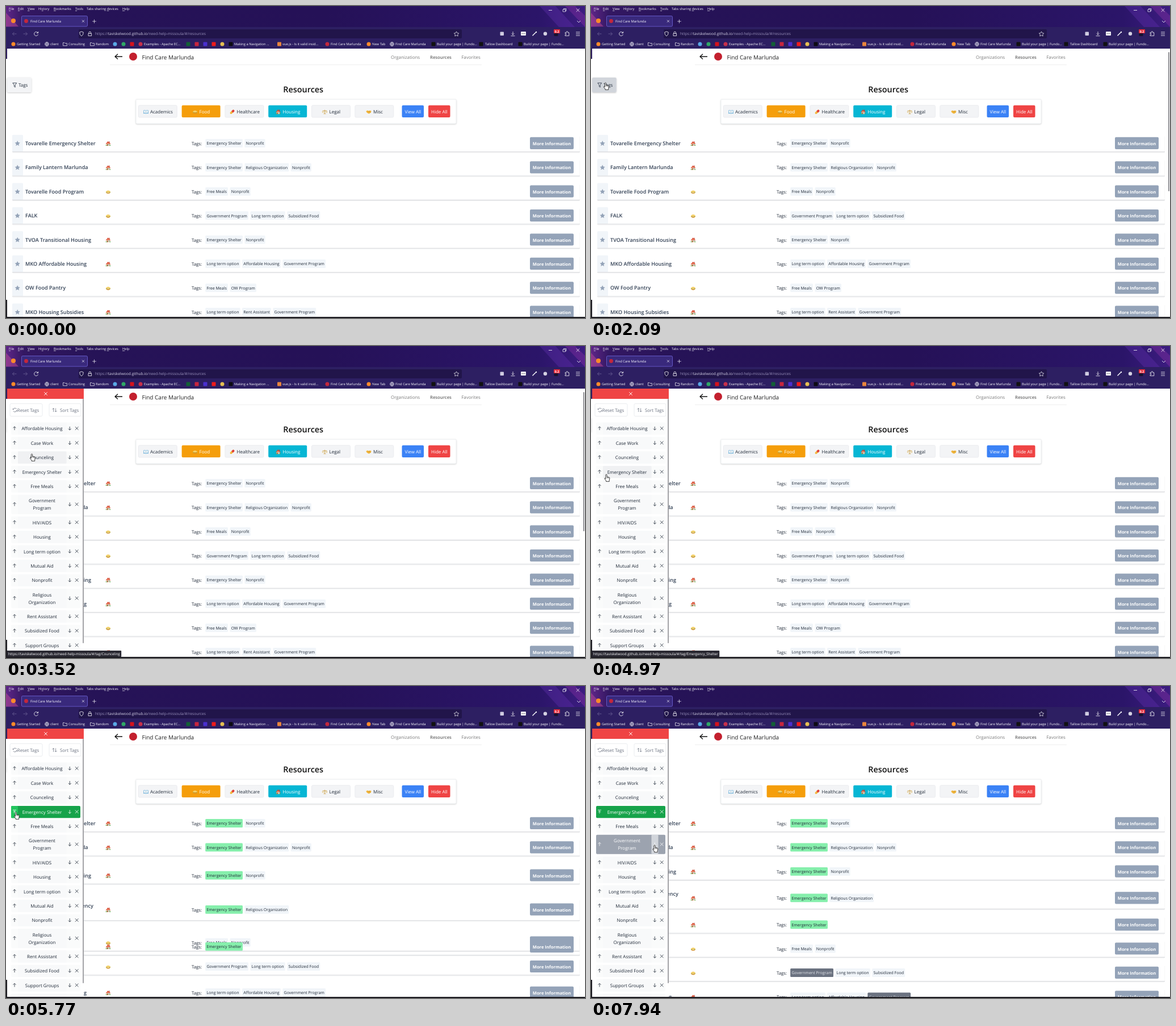
Write an HTML page that moves like this. It is 1020x549 px and loops after 8 s.

```html
<!DOCTYPE html>
<html lang="en">
<head>
<meta charset="utf-8">
<title>Find Care Marlunda</title>
<style>
  html, body { margin: 0; width: 100%; height: 100%; overflow: hidden; background: #fff; }
  svg { display: block; width: 100vw; height: 100vh; }
  text { font-family: 'Open Sans', 'Noto Sans', sans-serif; text-rendering: geometricPrecision; white-space: pre; }
</style>
</head>
<body>
<svg viewBox="0 0 1020 549">
  <defs>
    <linearGradient id="theme">
      <stop offset="0" stop-color="#5f2688"/><stop offset=".03" stop-color="#341863"/>
      <stop offset=".15" stop-color="#261357"/><stop offset=".55" stop-color="#251157"/>
      <stop offset=".92" stop-color="#2b1569"/><stop offset="1" stop-color="#3c1c80"/>
    </linearGradient>
    <filter id="soft" x="-20%" y="-20%" width="140%" height="150%">
      <feDropShadow dx="0" dy=".7" stdDeviation=".9" flood-opacity=".25"/>
    </filter>
  </defs>
  <g id="page"></g>
  <g id="live"></g>
  <g id="chrome"></g>
</svg>
<script>
const LOOP = 8000;
const SITE = 'Find Care Marlunda';
const HOST = 'https://taviskelwood.github.io', PATH = '/need-help-missoula/#/';
const byId = id => document.getElementById(id);

// Drawing helpers: each returns SVG markup
const rect = (x, y, w, h, fill, r = 0, more = '') =>
  `<rect x="${x}" y="${y}" width="${w}" height="${h}" rx="${r}" fill="${fill}" ${more}/>`;
const disc = (x, y, r, fill) => `<circle cx="${x}" cy="${y}" r="${r}" fill="${fill}"/>`;
const line = (d, stroke, w = .8, fill = 'none') =>
  `<path d="${d}" stroke="${stroke}" stroke-width="${w}" fill="${fill}" stroke-linejoin="round"/>`;
const shape = (d, fill, more = '') => `<path d="${d}" fill="${fill}" ${more}/>`;
const text = (x, y, size, str, fill, more = '') =>
  `<text x="${x}" y="${y}" font-size="${size}" fill="${fill}" ${more}>${str}</text>`;
const at = (x, y, body) => `<g transform="translate(${x} ${y})">${body}</g>`;
const MID = 'text-anchor="middle"';

const pen = document.createElement('canvas').getContext('2d');
function textWidth(str, size) {
  pen.font = `${size}px 'Open Sans', 'Noto Sans', sans-serif`;
  return pen.measureText(str).width;
}

// Timing helpers
const ramp = (t, a, b) => Math.min(1, Math.max(0, (t - a) / (b - a)));
const smooth = k => k * k * (3 - 2 * k);
function ease(x) { // CSS "ease" curve
  let lo = 0, hi = 1, s = .5;
  for (let i = 0; i < 20; i++) {
    s = (lo + hi) / 2;
    const bx = .75 * (1 - s) * s + s ** 3;
    if (bx < x) lo = s; else hi = s;
  }
  return .3 * (1 - s) ** 2 * s + 3 * (1 - s) * s * s + s ** 3;
}

// Small pictograms, centred on 0,0
const icon = {
  house: rect(-2.9, -.6, 5.8, 4.4, '#f0d9b4') + rect(1.5, -3.9, 1.2, 2.4, '#b5402c') +
    shape('M-4.2 .4L-.4-4.2 4.2 .4 3.2 1 -.4-2.2-3.4 1Z', '#d9472f') + shape('M-2.9 0L-.4-2.4 2.6 0Z', '#e2674a') +
    rect(-2, .9, 1.7, 2.9, '#9a5b3a') + rect(.7, .8, 1.5, 1.5, '#6fa9cc') + disc(-3.4, 3, .9, '#57a345') + disc(3.3, 3, .9, '#57a345'),
  sandwich: shape('M-4.2 0Q-3-2.6 0-2.6T4.2 0L3.6 1H-3.6Z', '#f3cf69') + shape('M-4 .3Q0 1.9 4 .3L3.6 1.3H-3.6Z', '#7a9a36') +
    shape('M-4 .9Q0 2.4 4 .9Q3.2 3.3 0 3.3T-4 .9Z', '#d6942f'),
  book: shape('M-4.5-2.5Q-2-3.6 0-2.4Q2-3.6 4.5-2.5V3Q2 2.2 0 3.2Q-2 2.2-4.5 3Z', '#5aa7d6') +
    shape('M-3.9-2.4Q-2-3 0-1.8Q2-3 3.9-2.4V2Q2 1.4 0 2.4Q-2 1.4-3.9 2Z', '#e8f1f6') + line('M0-1.8V2.6', '#9db9c8', .5),
  pill: '<g transform="rotate(-42)">' + rect(-4.6, -1.9, 9.2, 3.8, '#f3b53f', 1.9) +
    shape('M0-1.9H2.7A1.9 1.9 0 0 1 2.7 1.9H0Z', '#df3e3e') + '</g>',
  scales: line('M0-3.6V3M-3.6-2H3.6M-2 3.4H2', '#c79a3a', .8) +
    shape('M-4.8 .2H-1.4Q-3 2.6-4.8 .2M1.4 .2H4.8Q3 2.6 1.4 .2', '#e3bd62') + line('M-3.2-2L-4.6 .2M-3.2-2L-1.6 .2M3.2-2L1.6 .2M3.2-2L4.6 .2', '#c79a3a', .4),
  hands: shape('M-4.6-1.4L-2-2.6 0-1.6 2.2-2.6 4.6-1.2 3.6 1.4 .8 3.2-1.2 2.6-3.8 .8Z', '#f0b53c') + line('M-1 0L1-1 3 1', '#b97f1e', .6),
  globe: line('M-3.4 0A3.4 3.4 0 1 1 3.4 0A3.4 3.4 0 1 1-3.4 0M-3.4 0H3.4M0-3.4Q-3 0 0 3.4Q3 0 0-3.4', '#fbfbfe', .7),
  folder: line('M-3.5-2.4H-1L0-1.4H3.5V2.8H-3.5Z', '#fbfbfe', .7)
};

const upArrow = 'M0 3.1V-3M-2.5-.6L0-3.1 2.5-.6';
const topArrow = 'M-3-3H3M0 3.1V-1.4M-2.2 .7L0-1.5 2.2 .7';
const downArrow = 'M0-3.1V3M-2.5 .6L0 3.1 2.5 .6';
const cross = 'M-2.8-2.8L2.8 2.8M2.8-2.8L-2.8 2.8';

function chromeMarkup() {
  const W = '#fbfbfe', dim = '#6d6399';
  let s = rect(0, 0, 1020, 37, 'url(#theme)') +
    shape('M940 0H968L1002 37H974Z', '#6a35b8', 'opacity=".3"') +
    shape('M985 0H1003L1020 17V37Z', '#a13bb0', 'opacity=".3"') +
    shape('M0 12L22 36H0Z', '#d8569a', 'opacity=".4"') +
    rect(0, 37, 1020, 38, '#2d1f62') + rect(128, 41, 675, 16, '#21154a', 2);

  const menus = [[5, '_File'], [21, '_Edit'], [38, '_View'], [57, 'Hi_story'], [84, '_Bookmarks'],
    [122, '_Tools'], [142, 'Tabs sharing _devices'], [205, '_Help']];
  for (const [x, name] of menus)
    s += text(x, 7.4, 5.85, name.replace(/_(.)/, '<tspan text-decoration="underline">$1</tspan>'), W);

  // Tab strip and window buttons
  s += disc(13, 26, 4, '#ff8a2a') + rect(27.5, 17.5, 116, 18.5, '#39297c', 2, 'stroke="#6a5fd0" stroke-width=".9"') +
    disc(35.5, 26.5, 3.4, '#c3273c') + text(43, 29, 5.9, SITE, W) +
    at(136, 26.7, line('M-2-2L2 2M2-2L-2 2', W, .7)) + at(155.5, 27, line('M-3.3 0H3.3M0-3.3V3.3', W, .7)) +
    line('M956 7.5H962', W, .8) + line('M981 6H985.5V10H981ZM982.5 6V4.7H987V8.7H985.5', W, .7) +
    at(1007.5, 7.3, line(cross, W, .8)) + line('M1006 26L1009 29 1012 26', W, .8);

  // Navigation bar
  s += line('M18.5 49H11.5M14.5 46L11.5 49 14.5 52M30.5 49H37.5M34.5 46L37.5 49 34.5 52', dim) +
    line('M56 47A3.5 3.5 0 1 0 56.5 50M56.7 45V47.6H54', W) +
    line('M133 45L136.3 46.2Q136.3 51.5 133 53Q129.7 51.5 129.7 46.2Z', W) +
    line('M145 48.5H150.6V52.5H145ZM146 48.5V47A1.8 1.8 0 0 1 149.6 47V48.5', W) +
    text(157, 51.4, 6.65, `${HOST.slice(0, 8)}<tspan fill="#d8d4ea">${HOST.slice(8)}</tspan>${PATH}resources`, '#9a92bd') +
    line('M793.5 44.9L794.9 47.6 797.8 48 795.7 50.1 796.2 53 793.5 51.6 790.8 53 791.3 50.1 789.2 48 792.1 47.6Z', W, .7) +
    rect(870.5, 45.5, 6.5, 6.5, '#cfcbe0', 1) + line('M893 45V50.5M890.7 48.3L893 50.6 895.3 48.3M889.5 52.6H896.5', W) +
    rect(907, 45, 9, 7, '#f1f0f6', 1) + [909.3, 911.5, 913.7].map(x => disc(x, 48.6, .7, '#333')).join('') +
    line('M927.5 52.3L933 46.8', W, 1.4) + disc(934, 46, 1.2, W) + disc(950, 48.8, 3.2, '#d5d2e2') +
    rect(965.5, 47, 7, 6, '#17112f', 1) + rect(965, 41, 11, 7, '#e22b3c', 1) +
    text(970.5, 46.6, 5.4, '0.2', '#fff', MID + ' font-weight="700"') +
    line('M985 46.8H987.2Q987 44.6 988.5 44.6T989.8 46.8H991.8V52.4H985V50.6Q987 50.6 987 49.5T985 48.4Z', W) +
    line('M1004 46H1011M1004 49H1011M1004 52H1011', W);

  // Bookmarks: icon x, icon (pictogram, or o/s for disc/square and its colour), text x, label
  const marks = [[13, 'o#ff8a2a', 19, 'Getting Started'], [72, 'globe', 78, 'client'], [104, 'folder', 110, 'Consulting'],
    [152, 'folder', 158, 'Random'], [192, 'o#5aa9e6'], [207, 'o#2fa866'], [222, 's#d5121c'],
    [237, 'o#c8304a', 243, 'Examples - Apache EC...'], [321, 's#125f36'], [336, 's#c9263e'], [351, 's#4a2fd0'], [366, 's#f01b1b'],
    [381, 'o#e6bf52'], [396, 's#0d0b12', 402, 'Making a Navigation ...'], [481.5, 's#e8843c', 487, 'vue.js - Is it valid insid...'],
    [566, 'o#c3273c', 572, SITE], [639, 'o#ff8a2a', 645, 'New Tab'], [680, 'globe', 686, SITE],
    [753, 's#111', 759, 'Build your page | Fundo...'], [837, 's#111', 844, 'Tallow Dashboard'], [906, 's#111', 912, 'Build your page | Fundo...']];
  for (const [x, kind, tx, label] of marks) {
    const fill = kind.slice(1);
    s += icon[kind] ? at(x, 67, icon[kind]) : kind[0] === 'o' ? disc(x, 67, 3.5, fill) : rect(x - 3.5, 63.5, 7, 7, fill, 1);
    if (label) s += text(tx, 69.1, 5.85, label, W);
  }
  // Window edges
  return s + rect(0, 74, 2, 19, '#2b1a5c') + rect(0, 517, 2, 32, '#1b1a20') + rect(0, 547, 1020, 2, '#1b1a20');
}

function pageMarkup() {
  let s = rect(0, 75, 1020, 474, '#fff') +
    line('M205 89H192M197 84.5L192 89 197 93.5', '#111', 1.3) + disc(224, 89, 7, '#c3202e') +
    text(239.5, 93.8, 10, SITE, '#222') + rect(183, 103, 655, 1, '#efefef') +
    text(678, 92.8, 7.9, 'Organizations', '#7b7b7b') + text(747, 92.8, 7.7, 'Resources', '#6a6a6a', 'font-weight="600"') +
    text(802.3, 92.8, 7.9, 'Favorites', '#7b7b7b') +
    text(523.7, 151.8, 14.4, 'Resources', '#111', MID + ' font-weight="600"') +
    rect(229, 164.3, 564, 42.7, '#fff', 2, 'stroke="#e5e7eb" stroke-width=".6" filter="url(#soft)"');
  const filters = [['Academics', 'book', 246.5, 254], ['Food', 'sandwich', 333, 340.5, '#f59e0b'], ['Healthcare', 'pill', 398.5, 406.5],
    ['Housing', 'house', 479.5, 487.5, '#06b6d4'], ['Legal', 'scales', 561.5, 569.5], ['Misc', 'hands', 639, 647]];
  filters.forEach(([name, pic, ix, tx, fill], i) => {
    s += rect(233.3 + i * 76.3, 174.7, 68, 21.3, fill || '#f3f4f6', 2, fill ? '' : 'stroke="#e5e7eb" stroke-width=".7"') +
      at(ix, 186.3, icon[pic]) + text(tx, 189.3, 8, name, fill ? '#fff' : '#1f2937');
  });
  return s + rect(697.5, 174.7, 38.5, 21.3, '#3b82f6', 2) + text(716.8, 189.3, 8, 'View All', '#fff', MID) +
    rect(744, 174.7, 38.5, 21.3, '#ef4444', 2) + text(763.3, 189.3, 8, 'Hide All', '#fff', MID);
}

// Resource rows: name lines, pictogram, tags, centre before and after sorting
const ES = 'Emergency Shelter', NP = 'Nonprofit', GP = 'Government Program', LT = 'Long term option';
const resources = [
  ['Tovarelle Emergency Shelter', 'house', [ES, NP], 241.4, 241.4],
  ['Family Lantern Marlunda', 'house', [ES, 'Religious Organization', NP], 283.8, 283.8],
  ['Tovarelle Food Program', 'sandwich', ['Free Meals', NP], 326.2, 462],
  ['FALK', 'sandwich', [GP, LT, 'Subsidized Food'], 368.6, 504.4],
  ['TVOA Transitional Housing', 'house', [ES, NP], 411, 326.2],
  ['MKO Affordable Housing', 'house', [LT, 'Affordable Housing', GP], 453.4, 546.8],
  ['OW Food Pantry', 'sandwich', ['Free Meals', 'OW Program'], 495.8, 589.2],
  ['MKO Housing Subsidies', 'house', [LT, 'Rent Assistant', GP], 538.2, 631.6],
  ['Ashgrove Home Emergency|Shelter', 'house', [ES, 'Religious Organization'], 626.8, 372.8],
  ['Harbor Nook', 'house', [ES], 900, 419.8]
];
const STAR = 'M0-4.6L1.4-1.6 4.6-1.2 2.2 1 2.9 4.2 0 2.6-2.9 4.2-2.2 1-4.6-1.2-1.4-1.6Z';

function resourceRow([name, pic, tags, from, to], t) {
  const y = from + (to - from) * ease(ramp(t, 5390, 5970));
  const lines = name.split('|'), half = lines.length > 1 ? 19 : 14.7;
  let s = rect(11, -half, 19, half * 2, '#f1f5f9', 1.5) +
    rect(11, half, 1000, 1.1, '#d6d8db') + rect(12, half + 1.1, 998, 1.2, '#f0f1f2') + rect(1010.5, -half + 3, .6, half * 2 - 3, '#f1f1f1') +
    at(20.2, .3, shape(STAR, '#94a3b8'));
  lines.forEach((str, i) =>
    s += text(34, 3.6 + (i - (lines.length - 1) / 2) * 14, 9.1, str, '#334155', 'font-weight="600"'));
  s += at(180, .8, icon[pic]) + text(327, 3.6, 7.8, 'Tags:', '#1f2937');
  let x = 351.2;
  for (const tag of tags) {
    const w = textWidth(tag, 7.05) + 4.4;
    const green = tag === ES ? ramp(t, 5330, 5420) : 0, gray = tag === GP ? ramp(t, 7850, 7940) : 0;
    s += rect(x, -7.3, w, 14.8, '#f1f5f9', 1.5) +
      rect(x, -7.3, w, 14.8, green ? '#86efac' : '#6b7280', 1.5, `opacity="${green + gray}"`) +
      text(x + 2.2, 3, 7.05, tag, gray > .5 ? '#e5e7eb' : '#1f2937');
    x += w + 3.4;
  }
  s += rect(923, -10.6, 77, 21.2, '#94a3b8', 2) + text(961.5, 3.6, 7.6, 'More Information', '#fff', MID + ' font-weight="700"');
  return at(0, y, s);
}

// Sidebar rows, stacked top to bottom
const tagRows = ['Affordable Housing', 'Case Work', 'Counceling', ES, 'Free Meals', 'Government|Program', 'HIV/AIDS', 'Housing',
  LT, 'Mutual Aid', NP, 'Religious|Organization', 'Rent Assistant', 'Subsidized Food', 'Support Groups', ''];
const cells = [[9, 21], [21, 106.5], [106.5, 118.5], [118.5, 131]];

function sidebar(t, mouse) {
  let s = rect(2, 75, 135, 473, '#fff') + rect(2, 75, 135, 18, '#ef4444') + at(70, 84, line(cross, '#fff', .9)) +
    rect(7, 101.5, 57, 22, '#fff', 2, 'stroke="#e5e7eb" stroke-width=".8"') +
    rect(76, 101.5, 56, 22, '#fff', 2, 'stroke="#e5e7eb" stroke-width=".8"') +
    line('M12.6 111.6A3.3 3.3 0 0 1 18.6 111M18.8 113.6A3.3 3.3 0 0 1 12.8 114.4M11.4 110.4L12.6 112 14 110.8M20 114.8L18.8 113.2 17.4 114.4', '#6b7280') +
    text(19.8, 116, 7.9, 'Reset Tags', '#6b7280') +
    line('M83.5 116V109.5M81.5 111.5L83.5 109.5 85.5 111.5M87.6 109.5V116M85.6 114L87.6 116 89.6 114', '#6b7280', .7) +
    text(95, 116, 7.9, 'Sort Tags', '#6b7280');
  let top = 134.6;
  tagRows.forEach((name, i) => {
    const lines = name.split('|'), h = lines.length > 1 ? 34 : 21.4, y = top + h / 2;
    const on = i === 3 ? ramp(t, 5330, 5420) : i === 5 ? ramp(t, 7850, 7940) : 0;
    const ink = on > .5 ? '#fff' : '#1f2937';
    s += rect(9, top, 122, h, '#fafbfb', 2) + rect(21, top, 85.5, h, '#f8f9fa') +
      rect(9, top, 122, h, i === 3 ? '#16a34a' : '#9ca3af', 2, `opacity="${on}"`);
    if (t > 2790 && mouse.y >= top && mouse.y < top + h)
      cells.forEach(([a, b], c) => {
        if (mouse.x < a || mouse.x >= b) return;
        const fill = on > .5 ? (i === 3 ? '#22c55e' : '#d1d5db') : c === 1 ? '#f0f1f3' : '#e5e7eb';
        s += rect(a, top, b - a, h, fill, 1.5);
      });
    lines.forEach((str, n) => s += text(63.5, y + 3 + (n - (lines.length - 1) / 2) * 12.8, 8, str, ink, MID));
    s += at(15, y - .4, line(i === 3 && on > .5 ? topArrow : upArrow, ink)) +
      at(112.3, y - .4, line(downArrow, ink)) + at(124.7, y - .4, line(cross, ink));
    top += h + 4.05;
  });
  return s + rect(135.3, 93, 1.5, 430, '#85858a', .7);
}

// Pointer path: time, x, y
const path = [[1230, 215, 325], [2010, 25.5, 135], [2700, 25.5, 135], [3070, 44, 152], [3520, 45.5, 190], [3700, 42, 200],
  [3890, 42, 200], [3980, 42, 202], [4160, 42, 202], [4880, 27, 226], [4970, 27, 226], [5150, 17.5, 222],
  [6780, 17.5, 222], [7580, 112, 280], [LOOP, 112, 280]];
function pointer(t) {
  const i = Math.max(1, path.findIndex(p => p[0] > t));
  const [t0, x0, y0] = path[i - 1], [t1, x1, y1] = path[i], k = smooth(ramp(t, t0, t1));
  return { x: x0 + (x1 - x0) * k, y: y0 + (y1 - y0) * k };
}
const HAND = 'M-1.1 .6Q0-1.1 1.1 .6V4.2L4.9 5Q6 5.3 5.9 6.8L5.2 10.2V12.4H-.4V11L-3 7.8Q-3.3 6.3-2 6.5L-1.1 7.6Z';
const ARROW = 'M0 0V10L2.4 7.8 4 11.3 5.5 10.7 3.9 7.2H7Z';

const links = [[2790, 3200, 'Affordable_Housing'], [3200, 3430, 'Case_Work'], [3430, 4470, 'Counceling'], [4470, 5330, 'Emergency_Shelter']];

function scene(t) {
  const mouse = pointer(t), overTags = ramp(t, 2000, 2090);
  let s = resources.map(r => resourceRow(r, t)).join('') +
    rect(2, 126, 42.7, 26, '#f3f4f6', 2, 'filter="url(#soft)"') + rect(2, 126, 42.7, 26, '#d1d5db', 2, `opacity="${overTags}"`) +
    line('M11.8 135.4H18.8L16.2 139V143L14.4 141.8V139Z', '#374151', .9) + text(22, 142.4, 8, 'Tags', '#1f2937');
  if (t >= 1230) s += rect(1017, 81, 1.8, 245, '#85858a', .9, `opacity="${1 - ramp(t, 4160, 4500)}"`);
  if (t > 2270) s += at(-138 * (1 - ease(ramp(t, 2270, 2790))), 0, sidebar(t, mouse));
  const link = links.find(([a, b]) => t >= a && t < b);
  if (link) {
    const url = `${HOST}${PATH}tag/${link[2]}`;
    s += rect(0, 536, textWidth(url, 6.2) + 6.5, 11, '#2b2a33', 1) + text(4, 543.8, 6.2, url, '#fbfbfe');
  }
  if (t >= 1230) {
    const hand = t > 2270 || (mouse.x < 45 && mouse.y < 152);
    s += at(mouse.x, mouse.y, line(hand ? HAND : ARROW, '#111', .8, '#fff') +
      (hand ? line('M1.1 4.2V6.6M2.6 5V7M4.1 5.2V7.2', '#111', .5) : ''));
  }
  return s;
}

byId('page').innerHTML = pageMarkup();
byId('chrome').innerHTML = chromeMarkup();
const start = performance.now();
function draw() {
  byId('live').innerHTML = scene((performance.now() - start) % LOOP);
  requestAnimationFrame(draw);
}
draw();
</script>
</body>
</html>
```
